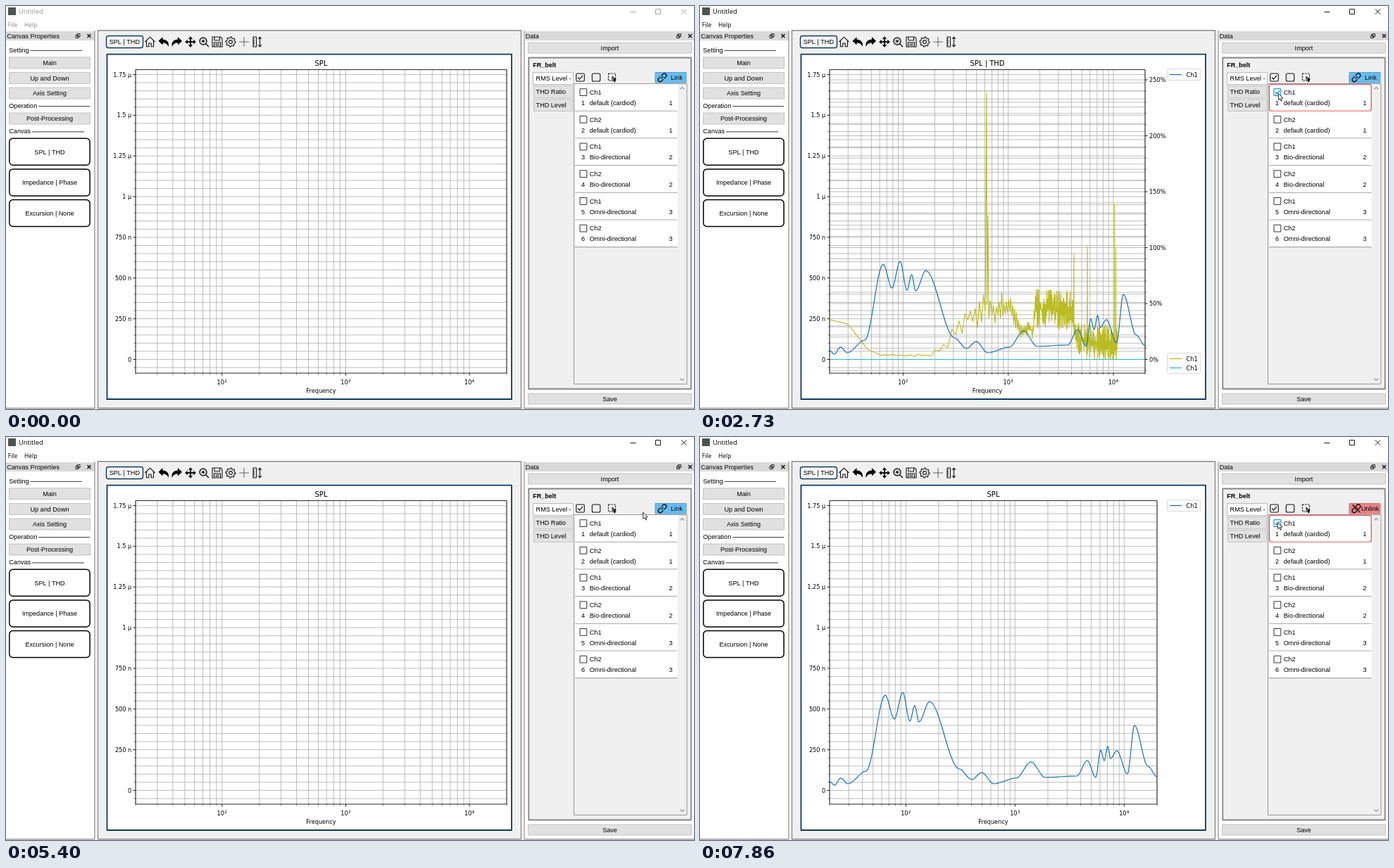
Animation of 977x573 px, one loop 8 s. Source, as an HTML page with a canvas:

```html
<!DOCTYPE html>
<html lang="en">
<head>
<meta charset="utf-8">
<style>
  html, body { margin: 0; width: 100%; height: 100%; overflow: hidden; background: #fff; }
  canvas { display: block; }
</style>
</head>
<body>
<canvas id="stage" width="977" height="573"></canvas>
<script>
const c = document.getElementById('stage').getContext('2d');
const LOOP = 8000;
const UI = '9.1px "Liberation Sans", Arial, sans-serif';
const UI_BOLD = 'bold 9px "Liberation Sans", Arial, sans-serif';
const plotFont = size => size + 'px "DejaVu Sans", sans-serif';
const sysFont = size => size + 'px "Open Sans", sans-serif';
const NAVY = '#0b3a66', BLUE = '#1f77b4', OLIVE = '#bcbd22', TEAL = '#17becf', EDGE = '#8a8a8a';

// ---------- drawing helpers ----------
function text(s, x, y, { font = UI, color = '#000', align = 'left' } = {}) {
  c.font = font; c.fillStyle = color; c.textAlign = align;
  c.fillText(s, x, y);
}
function box(x, y, w, h, fill, stroke, lw = 1, r = 0) {
  c.beginPath();
  c.roundRect(x, y, w, h, r);
  if (fill) { c.fillStyle = fill; c.fill(); }
  if (stroke) { c.strokeStyle = stroke; c.lineWidth = lw; c.stroke(); }
}
function line(x1, y1, x2, y2, color = '#000', lw = 1) {
  c.beginPath(); c.moveTo(x1, y1); c.lineTo(x2, y2);
  c.strokeStyle = color; c.lineWidth = lw; c.stroke();
}
function polyline(pts, color, lw) {
  c.beginPath();
  for (const [x, y] of pts) c.lineTo(x, y);
  c.strokeStyle = color; c.lineWidth = lw; c.lineJoin = 'round'; c.stroke();
}
function icon(x, y, d, { fill, stroke = '#111', lw = 1.1, flip = 1 } = {}) {
  const path = new Path2D(d);
  c.save();
  c.translate(x, y); c.scale(flip, 1);
  if (fill) { c.fillStyle = fill; c.fill(path); }
  if (stroke) { c.strokeStyle = stroke; c.lineWidth = lw; c.stroke(path); }
  c.restore();
}
function button(label, x, y, w, h) {
  box(x + .5, y + .5, w, h, '#e1e1e1', '#c3c3c3');
  text(label, x + w / 2 + .5, y + h / 2 + 3.8, { align: 'center' });
}
function dockTitle(label, x, w) {
  box(x, 36, w, 13, '#d9d9d9');
  text(label, x + 1.2, 45.6);
  const r = x + w;
  icon(r - 24, 42.5, 'M-1-3H3V1H-1ZM-3-1H1V3H-3Z', { lw: .9 });
  icon(r - 8, 42.5, 'M-2.5-2.5L2.5 2.5M2.5-2.5L-2.5 2.5', { lw: 1.4 });
}

// ---------- pointer: each move starts where the last one ended ----------
const STEP = 69;
const inOut = u => u * u * (3 - 2 * u);
const moves = [
  { from: 260, to: 410, x: 853, y: 248 },
  { from: 610, to: 1370, x: 824, y: 128, easeX: u => u ** 1.5, easeY: u => 1 - (1 - u) ** 4.2 },
  { from: 1440, to: 1790, x: 821, y: 124 },
  { from: 4920, to: 5600, x: 923, y: 103 },
  { from: 6280, to: 7040, x: 823, y: 123 },
  { from: 7110, to: 7860, x: 820, y: 121 },
];
function pointerAt(t) {
  if (t < moves[0].from) return null;
  let x = 853, y = 372;
  for (const m of moves) {
    if (t < m.from) break;
    const steps = Math.round((m.to - m.from) / STEP) + 1;
    const pace = (m.to - m.from) / (steps - 1);
    const u = Math.min(1, (Math.floor((t - m.from) / pace + .05) + 1) / steps);
    x += (m.x - x) * (m.easeX || inOut)(u);
    y += (m.y - y) * (m.easeY || inOut)(u);
  }
  return { x, y };
}

// ---------- window, left dock, toolbar ----------
function drawWindow(active, menuActive) {
  box(0, 0, 977, 573, '#fff');
  box(3, 2, 11, 11, '#4b5552');
  const ink = active ? '#000' : '#999';
  text('Untitled', 18, 11.2, { font: sysFont(9.3), color: ink });
  line(886.5, 8.5, 894.5, 8.5, ink, .9);
  box(922.5, 4.5, 7, 7, null, ink, .9);
  icon(962.5, 8, 'M-3.7-3.7L3.7 3.7M3.7-3.7L-3.7 3.7', { stroke: ink, lw: .9 });
  const menu = { font: sysFont(8.5), color: menuActive ? '#000' : '#8c8c8c' };
  text('File', 2.8, 30, menu);
  text('Help', 26, 30, menu);
}
function section(label, y, lineEnd) {
  text(label, 4.3, y);
  line(4.3 + c.measureText(label).width + 2, y - 2.4, lineEnd, y - 2.4, '#222', .9);
}
function drawLeft() {
  dockTitle('Canvas Properties', 0, 126);
  line(126, 35, 126, 572, EDGE, 1.2);
  line(0, 571.8, 126, 571.8, EDGE, 1.2);
  section('Setting', 65.7, 108);
  ['Main', 'Up and Down', 'Axis Setting'].forEach((s, i) => button(s, 4, 72.3 + 21.6 * i, 115, 16));
  section('Operation', 145, 119);
  button('Post-Processing', 4, 151.5, 115, 16);
  section('Canvas', 181.3, 111);
  ['SPL | THD', 'Impedance | Phase', 'Excursion | None'].forEach((s, i) => {
    const y = 188.3 + 43.6 * i;
    box(4.8, y, 114.3, 38, '#fff', '#000', 1.5, 5);
    text(s, 62, y + 22.3, { align: 'center' });
  });
}
function gearPath() {
  let d = '';
  for (let i = 0; i < 32; i++) {
    const a = i * Math.PI / 16, r = i % 4 < 2 ? 7 : 5.4;
    d += (i ? 'L' : 'M') + (r * Math.cos(a)).toFixed(2) + ' ' + (r * Math.sin(a)).toFixed(2);
  }
  return d + 'ZM2.4 0A2.4 2.4 0 1 1-2.4 0A2.4 2.4 0 1 1 2.4 0';
}
const GEAR = gearPath();
const ARROW = 'M-7.5-1.2L-1.5-7V-3.5C4-3.5 8 0 6.8 7C5 3.2 3 1.6-1.5 1.6V4.6Z';
function drawToolbar() {
  const solid = { fill: '#000', stroke: null };
  box(130.5, 34.7, 601, 537, '#f0f0f0', EDGE, 1.4);
  box(142.5, 42.5, 52, 17, '#f6f6f6', NAVY, 1.4, 3);
  text('SPL | THD', 168.3, 54.3, { align: 'center' });
  icon(204.5, 51, 'M-7 0L0-6.8L7 0M-5-1.5V6.8H-1.7V2H1.7V6.8H5V-1.5');
  icon(224, 51, ARROW, solid);
  icon(242.5, 51, ARROW, { ...solid, flip: -1 });
  icon(262, 51, 'M-5 0H5M0-5V5', { lw: 2 });
  for (let i = 0; i < 4; i++) {
    c.save();
    c.translate(262, 51); c.rotate(i * Math.PI / 2);
    icon(0, 0, 'M-3.2-4.3L0-7.8L3.2-4.3Z', solid);
    c.restore();
  }
  icon(281, 51, 'M4-1A5 5 0 1 1-6-1A5 5 0 1 1 4-1M2.7 2.7L7 7M-3.5-1H1.5M-1-3.5V1.5', { lw: 1.4 });
  icon(300, 51, 'M-7-7H4.8L7-4.8V7H-7ZM-4-7V-2.2H3.6V-7M-4.5 7V.8H4.5V7M-2.7 3H2.7M-2.7 5H2.7');
  icon(319, 51, GEAR);
  icon(338, 51, 'M-7 0H7M0-7V7', { stroke: '#555', lw: .9 });
  icon(357, 51, 'M-6-7H-1.5V7H-6ZM-6-4.2H-4M-6-1.4H-4M-6 1.4H-4M-6 4.2H-4M3.5-6.5V6.5M1-4L3.5-7L6-4M1 4L3.5 7L6 4');
}

// ---------- plot data ----------
const AX = { left: 184, top: 90.5, bottom: 522, zero: 502.5, major: 57.86 };
const mix = (a, b, u) => a + (b - a) * u;

// turning points of the response on a 465 px wide axis; the curve eases from one to the next
const turns = [
  [184, 490], [191, 495], [200, 485], [210, 493], [236, 475], [263, 367], [276, 401], [288, 363],
  [298, 404], [305, 382], [311, 405], [326, 376], [368, 472], [386, 487], [400, 477], [417, 493],
  [449, 485], [470, 462], [490, 484], [535, 482], [550, 460], [562, 484], [569, 445], [574, 460],
  [579, 440], [583, 457], [592, 446], [607, 479], [617, 410], [636, 468], [649, 483],
];
const response = [];
for (let i = 1; i < turns.length; i++) {
  const [a, b] = [turns[i - 1], turns[i]];
  for (let u = 0; u <= 1; u += .1) response.push([mix(a[0], b[0], u), mix(a[1], b[1], inOut(u))]);
}

// distortion: a trend [x, level, spread] with alternating noise, plus a few spikes
const trend = [
  [184, 446, 0], [210, 452, 0], [238, 488, 0], [255, 496, 1], [325, 497, 2], [350, 482, 6],
  [372, 447, 22], [400, 432, 24], [443, 427, 22], [454, 460, 12], [473, 460, 12],
  [475, 430, 30], [530, 433, 28], [533, 470, 22], [551, 478, 26], [593, 480, 26],
];
const spikes = [[407, 124], [409, 298], [531, 353], [550, 342], [588.5, 282], [590.5, 345]];
let seed = 7;
const random = () => (seed = seed * 16807 % 2147483647) / 2147483647;
const distortion = [];
for (let x = 184, side = 1; x < 593; side = -side) {
  const i = trend.findIndex(p => p[0] > x), [a, b] = [trend[i - 1], trend[i]];
  const u = (x - a[0]) / (b[0] - a[0]);
  distortion.push([x, Math.min(502, mix(a[1], b[1], u) + side * random() * mix(a[2], b[2], u))]);
  // samples are evenly spaced in frequency, so they crowd together on the log axis
  const next = x + Math.max(.5, Math.min(6, 4 * 10 ** ((375 - x) / 149)));
  distortion.push(...spikes.filter(s => s[0] > x && s[0] <= next));
  x = next;
}

// ---------- plot ----------
function legend(y, colors) {
  box(663.5, y, 47, 3 + 13 * colors.length, '#fff', '#d5d5d5', .9, 2);
  colors.forEach((color, i) => {
    const ly = y + 8 + 13 * i;
    line(667, ly, 684, ly, color, 1.3);
    text('Ch1', 690.5, ly + 3, { font: plotFont(8.2) });
  });
}
function drawPlot(mode) {
  const { left, top, bottom, zero, major } = AX;
  const right = { empty: 711, single: 649, twin: 632 }[mode];
  const w = right - left, mid = left + w / 2, font = plotFont(8.2);
  const GRID = '#adadad', THIN = .8;
  const tick = (x, y, dx, dy, big) => {
    const size = big ? 3.5 : 2;
    line(x, y, x + dx * size, y + dy * size, '#000', big ? .9 : .6);
  };
  box(143.5, 68.7, 574.5, 490.3, '#fff', NAVY, 1.8);

  for (let e = 1; e < 5; e++) for (let m = 1; m < 10; m++) {
    const value = m * 10 ** e;
    if (value < 20 || value > 20000) continue;
    const x = left + w / 3 * Math.log10(value / 20);
    line(x, top, x, bottom, GRID, THIN);
    tick(x, bottom, 0, 1, m === 1);
    if (m === 1) {
      text('10', x - 7.2, 538.2, { font });
      text(e, x + 3.4, 534.8, { font: plotFont(5.8) });
    }
  }
  for (let i = -1; i <= 35; i++) {
    const y = zero - i * major / 5, big = i % 5 === 0, nano = i * 50;
    line(left, y, right, y, GRID, THIN);
    tick(left, y, -1, 0, big);
    const label = nano >= 1000 ? nano / 1000 + ' µ' : nano ? nano + ' n' : '0';
    if (big) text(label, 178.3, y + 3.1, { font, align: 'right' });
  }
  if (mode === 'twin') {
    for (let i = -1; i <= 25; i++) {
      const y = zero - i * 15.9, big = i % 5 === 0;
      line(left, y, right, y, GRID, THIN);
      tick(right, y, 1, 0, big);
      if (big) text(i * 10 + '%', 638, y + 3.1, { font });
    }
    polyline(distortion, OLIVE, 1.15);
    line(left, zero, right, zero, TEAL, 1.1);
    legend(493.5, [OLIVE, TEAL]);
  }
  if (mode !== 'empty') {
    polyline(response.map(([x, y]) => [left + (x - left) * w / 465, y]), BLUE, 1.25);
    legend(89.5, [BLUE]);
  }
  box(left, top, w, bottom - top, null, '#111', .9);
  text(mode === 'twin' ? 'SPL | THD' : 'SPL', mid, 84.6, { font: plotFont(10), align: 'center' });
  text('Frequency', mid, 549.8, { font, align: 'center' });
}

// ---------- right dock ----------
const ROW_TOP = 111, ROW = 38.7;
const names = ['default (cardiod)', 'Bio-directional', 'Omni-directional'];
const CHAIN = 'M-1.5 1.5L1.5-1.5M-1.5-2.5L1-5A2.8 2.8 0 0 1 5-1L2.5 1.5M1.5 2.5L-1 5A2.8 2.8 0 0 1-5 1L-2.5-1.5';

function drawRow(i, hovered, checked, boxHot) {
  const y = ROW_TOP + ROW * i, group = i >> 1;
  box(808, y, 146, ROW, '#fff');
  if (hovered) box(808.5, y + .3, 144.7, ROW - .8, '#fff', '#e0353b', 1.1, 3);
  else line(808, y + ROW - .4, 953.5, y + ROW - .4, '#8f8f8f', 1);
  const ink = boxHot ? '#0078d7' : '#333';
  box(815, y + 6.7, 9.8, 9.8, '#fff', ink, 1);
  if (checked) icon(820, y + 11.6, 'M-3 0L-1 2.4L3.2-2.4', { stroke: ink, lw: 1.2 });
  text('Ch' + (i % 2 + 1), 828.8, y + 14.9);
  text(i + 1, 817, y + 29.9);
  text(names[group], 828.8, y + 29.9);
  text(group + 1, 946.5, y + 29.9, { align: 'right' });
}
function drawRight(linked, checked, pointer) {
  line(736, 35, 736, 572, EDGE, 1.2);
  line(736, 571.8, 977, 571.8, EDGE, 1.2);
  dockTitle('Data', 736.5, 243);
  button('Import', 741, 51.5, 232, 15);
  button('Save', 741, 550.5, 232, 15);
  box(742.3, 73.5, 230.5, 471, '#f0f0f0', '#858585', 1.8);
  text('FR_belt', 748.2, 87.4, { font: UI_BOLD });

  box(748.5, 94.5, 57, 17, '#fff', '#bbb');
  text('RMS Level -', 752.6, 106.2);
  ['THD Ratio', 'THD Level'].forEach((s, i) => {
    box(749.5, 113.5 + 19 * i, 55, 17, '#e2e2e2', '#c6c6c6');
    text(s, 752.6, 125.3 + 19 * i);
  });

  box(809.8, 96, 11.5, 11, null, '#111', 1.1, 1.5);
  icon(815.5, 101.5, 'M-3.2 0L-1 2.6L3.4-2.6', { lw: 1.2 });
  box(832.3, 96, 11.5, 11, null, '#111', 1.1, 2);
  c.setLineDash([2.4, 1.4]);
  box(855.5, 96, 10, 10, null, '#111', 1.2);
  c.setLineDash([]);
  icon(860.5, 99.5, 'M0 0V8L2-.1V6.2L3.6 9L5 8.2L3.6 5.6L6.5 5.2Z', { fill: '#000', stroke: null });

  box(922, 94.5, 44, 14.5, linked ? '#67bdf1' : '#e88583', linked ? '#4a9fd0' : '#cf6f6d');
  icon(932, 101.8, CHAIN + (linked ? '' : 'M-5.5-5.5L5.5 5.5'), { lw: 1.3 });
  text(linked ? 'Link' : 'Unlink', linked ? 944 : 939, 105.2);

  box(806.5, 110.5, 160.5, 427, '#f0f0f0', '#999');
  icon(960.3, 117, 'M-3 1.5L0-1.5L3 1.5', { stroke: '#999' });
  icon(960.3, 531, 'M-3-1.5L0 1.5L3-1.5', { stroke: '#999' });

  const inList = pointer && pointer.x > 808 && pointer.x < 954 && pointer.y > ROW_TOP;
  const hover = inList ? Math.floor((pointer.y - ROW_TOP) / ROW) : -1;
  const boxHot = hover === 0 && pointer.x < 826 && pointer.y > 116 && pointer.y < 128;
  for (let i = 0; i < 6; i++) drawRow(i, i === hover, checked && i === 0, boxHot && i === 0);
}

function render() {
  const t = performance.now() % LOOP;
  const mode = t >= 7860 ? 'single' : t >= 2730 && t < 4530 ? 'twin' : 'empty';
  const pointer = pointerAt(t);
  drawWindow(t >= 2050, t >= 2730);
  drawLeft();
  drawToolbar();
  drawPlot(mode);
  drawRight(t < 6000, mode !== 'empty', pointer);
  if (pointer) icon(pointer.x, pointer.y, 'M.3.3V9.6L2.4 7.6L4 11.2L5.5 10.5L4 7.1H6.9Z', { fill: '#fff', stroke: '#000', lw: .8 });
  requestAnimationFrame(render);
}
render();
</script>
</body>
</html>
```
